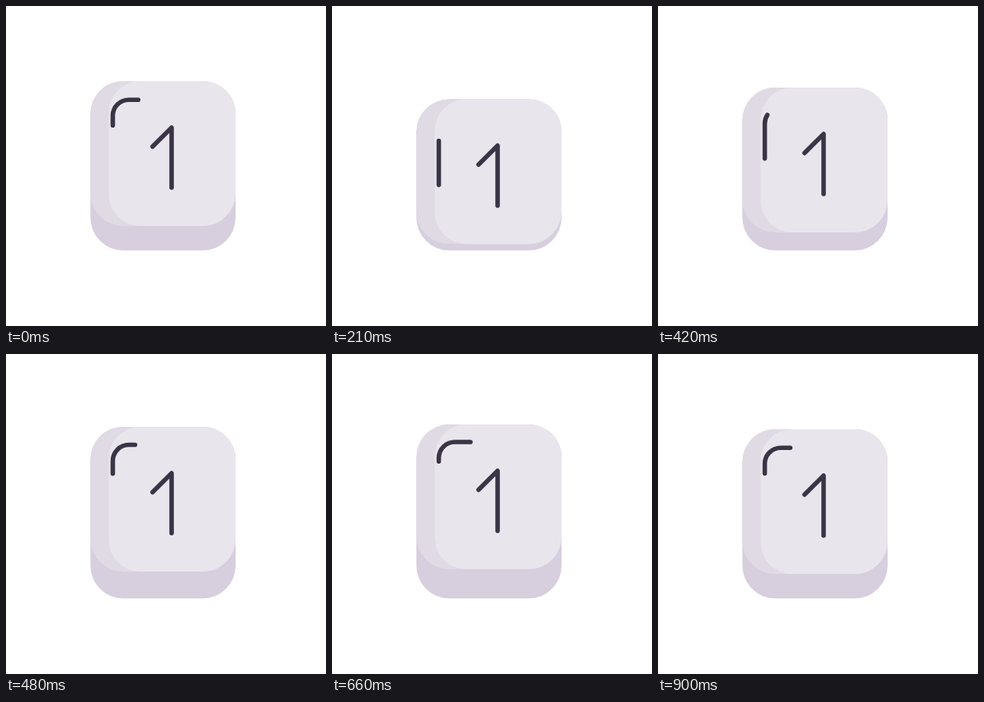
Recreate the animation shown at these times as an HTML page with a canvas. Size 400 by 400 pixels, loop 2930 ms.

```html
<!DOCTYPE html>
<html lang="en">
<head>
<meta charset="utf-8">
<title>Key press</title>
<style>
html, body { margin: 0; width: 100%; height: 100%; overflow: hidden; background: #fff; }
canvas { display: block; width: 400px; height: 400px; }
</style>
</head>
<body>
<canvas id="stage" width="400" height="400"></canvas>
<script>
const ctx = document.getElementById('stage').getContext('2d');
const LOOP = 2930, ACTIVE = 900, STEP = 30;
const LEFT = 105.5, RIGHT = 287, BOTTOM = 305.5, FACE = 181, RADIUS = 41;
const INK = '#3b3446';

// Cubic easing whose handles are flat at both ends.
function ease(p, x1 = 1 / 3, x2 = 2 / 3) {
  let lo = 0, hi = 1;
  for (let i = 0; i < 30; i++) {
    const u = (lo + hi) / 2, v = 1 - u;
    if (3 * u * v * v * x1 + 3 * u * u * v * x2 + u * u * u < p) lo = u;
    else hi = u;
  }
  return lo * lo * (3 - 2 * lo);
}

// Keys: [time, value, handle in, handle out] with handles for the span that ends there.
function track(keys, t) {
  for (let i = 1; i < keys.length; i++) {
    const [t0, v0] = keys[i - 1], [t1, v1, x1, x2] = keys[i];
    if (t < t1) return v0 + (v1 - v0) * ease((t - t0) / (t1 - t0), x1, x2);
  }
  return keys[keys.length - 1][1];
}

const topKeys = [[0, 94], [300, 118, 0.333, 0.208], [540, 86], [900, 94]];
const glintKeys = [[0, 43], [240, -4.5, 0.333, 0.11], [300, -4.5], [540, 53.5, 0.687, 0.667], [900, 43]];

function box(color, x, y, bottom, radii) {
  ctx.fillStyle = color;
  ctx.beginPath();
  ctx.roundRect(x, y, RIGHT - x, bottom - y, radii);
  ctx.fill();
}

function drawKey(y) {
  box('#d7cede', LEFT, y, BOTTOM, RADIUS);
  box('#e0dae4', LEFT, y, y + FACE, RADIUS);
  box('#e9e5ec', 128.5, y, y + FACE, [39, RADIUS, RADIUS, 39]);
}

function drawDigit(y) {
  ctx.beginPath();
  ctx.moveTo(183.2, y + 81.7);
  ctx.lineTo(207, y + 58);
  ctx.lineTo(207, y + 133);
  ctx.stroke();
}

// A fixed-length dash sliding up the side and around the corner.
function drawGlint(y, end) {
  const x = 133.5, r = 20, run = 80, len = 55;
  const h = 117.2 + 1.21 * (y - 94);
  ctx.save();
  ctx.setLineDash([len, 1000]);
  ctx.lineDashOffset = len - run - end;
  ctx.beginPath();
  ctx.moveTo(x, h + r + run);
  ctx.lineTo(x, h + r);
  ctx.arc(x + r, h + r, r, Math.PI, Math.PI * 1.5);
  ctx.lineTo(x + 80, h);
  ctx.stroke();
  ctx.restore();
}

function draw(t) {
  const y = track(topKeys, t);
  ctx.fillStyle = '#fff';
  ctx.fillRect(0, 0, 400, 400);
  drawKey(y);
  ctx.strokeStyle = INK;
  ctx.lineWidth = 5.6;
  ctx.lineCap = ctx.lineJoin = 'round';
  drawGlint(y, track(glintKeys, t));
  drawDigit(y);
}

const start = performance.now();
function tick() {
  const t = Math.max(0, performance.now() - start) % LOOP;
  draw(Math.min(ACTIVE, Math.floor(t / STEP) * STEP));
  requestAnimationFrame(tick);
}
tick();
</script>
</body>
</html>
```
